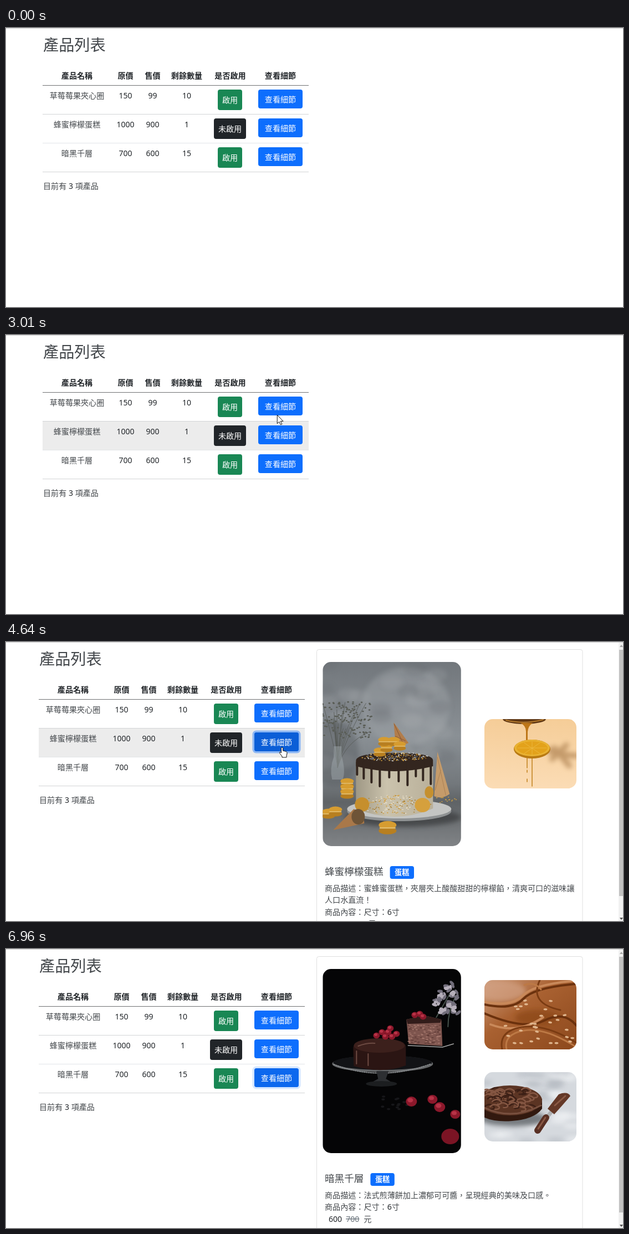
These frames come from a looping animation (1113 px wide and 503 px high, 7020 ms). An HTML page:

```html
<!DOCTYPE html>
<html lang="zh-TW">
<head>
<meta charset="utf-8">
<title>產品列表</title>
<style>
  html, body { margin: 0; width: 100%; height: 100%; overflow: hidden; background: #fff; }
  svg { display: block; }
  text { font-family: "Noto Sans", "Noto Sans CJK TC", "Noto Sans CJK JP", sans-serif; white-space: pre; }
</style>
</head>
<body>
<svg width="1113" height="503" viewBox="0 0 1113 503">
  <defs>
    <clipPath id="mainClip"><rect width="249.5" height="332" rx="15"/></clipPath>
    <clipPath id="thumbClip"><rect width="166" height="125" rx="15"/></clipPath>
    <filter id="soft" x="-50%" y="-50%" width="200%" height="200%"><feGaussianBlur stdDeviation="4"/></filter>
    <linearGradient id="slate" x2="0" y2="1">
      <stop stop-color="#687b86"/><stop offset=".25" stop-color="#5c6d78"/>
      <stop offset=".45" stop-color="#29323c"/><stop offset="1" stop-color="#303943"/>
    </linearGradient>
    <linearGradient id="stone" x2="0" y2="1">
      <stop stop-color="#72777c"/><stop offset=".4" stop-color="#8a9095"/>
      <stop offset=".66" stop-color="#73787c"/><stop offset=".76" stop-color="#5f6366"/><stop offset="1" stop-color="#808386"/>
    </linearGradient>
    <linearGradient id="icing"><stop stop-color="#9f9885"/><stop offset=".4" stop-color="#cbc3ad"/><stop offset="1" stop-color="#b9b09a"/></linearGradient>
    <linearGradient id="rose"><stop stop-color="#d8879a"/><stop offset="1" stop-color="#e19aa9"/></linearGradient>
    <linearGradient id="peach" x2="0" y2="1"><stop stop-color="#f5cd98"/><stop offset="1" stop-color="#fbdcb5"/></linearGradient>
    <linearGradient id="caramel" y2="1"><stop stop-color="#cf9f80"/><stop offset=".4" stop-color="#a96131"/><stop offset="1" stop-color="#8c481c"/></linearGradient>
  </defs>
  <g id="page"></g>
  <g id="cursor" fill="#fff" stroke="#111" stroke-linejoin="round">
    <path id="arrow" d="M0 0V15.5L3.6 12.2L6.2 17.6L8.6 16.5L6 11.3H10.8Z"/>
    <path id="hand" d="M-1.6 1.6Q-1.6 0 0 0T1.6 1.6V6L7.5 7.4Q9.4 8 9 11L8 15V18H0V16L-4.4 10.4Q-5 8 -3 8.4L-1.6 10Z"/>
  </g>
</svg>
<script>
const LOOP = 7020, FONT = 14.08, HOVER_LAG = 120, BLUR_AT = 6870;
const INK = '#212529', THIN_INK = '#43474b', BLUE = '#0d6efd', BLUE_DARK = '#0b5ed7';
const $ = id => document.getElementById(id);

// --- drawing helpers ---
const rect = (x, y, w, h, fill, more = '') => `<rect x="${x}" y="${y}" width="${w}" height="${h}" fill="${fill}" ${more}/>`;
const oval = (x, y, rx, ry, fill, more = '') => `<ellipse cx="${x}" cy="${y}" rx="${rx}" ry="${ry}" fill="${fill}" ${more}/>`;
const shape = (d, fill, more = '') => `<path d="${d}" fill="${fill}" ${more}/>`;
const line = (d, color, width = 1, more = '') => `<path d="${d}" fill="none" stroke="${color}" stroke-width="${width}" stroke-linecap="round" ${more}/>`;
const soft = 'filter="url(#soft)"';

// Light text keeps its Latin letters and digits at regular weight.
function text(x, middle, str, { size = FONT, weight = 300, fill, anchor = 'middle', more = '' } = {}) {
  const light = weight < 400;
  const body = light ? str.replace(/\w+/g, `<tspan font-weight="400" fill="${fill ?? INK}">$&</tspan>`) : str;
  return `<text x="${x}" y="${middle + size * .37}" font-size="${size}" font-weight="${weight}" fill="${fill ?? (light ? THIN_INK : INK)}" text-anchor="${anchor}" ${more}>${body}</text>`;
}

function scatter(count, seed, draw) {
  const random = () => (seed = (seed * 16807) % 2147483647) / 2147483647;
  return Array.from({ length: count }, () => draw(random(), random(), random())).join('');
}
const sprinkles = (x, y, rx, ry, count, seed, colors) => scatter(count, seed, (a, b, c) => {
  const px = x + Math.cos(a * 6.283) * rx * Math.sqrt(b), py = y + Math.sin(a * 6.283) * ry * Math.sqrt(b);
  return oval(px, py, 1.3, .8, colors[Math.floor(c * colors.length)]);
});
const CANDY = ['#f2d9d4', '#fff0ea', '#a94f69'];

// --- pictures, each in its own coordinates ---
const stackedDonut = (x, y, seed) =>
  oval(x, y + 5, 43, 17, '#a87046') + oval(x, y + 8, 38, 12, '#bd8658') +
  shape(`M${x - 43} ${y}Q${x - 40} ${y - 18} ${x} ${y - 18}T${x + 43} ${y}Q${x + 34} ${y + 8} ${x + 24} ${y + 4}T${x} ${y + 7}T${x - 24} ${y + 5}T${x - 43} ${y}`, '#ce8293') +
  sprinkles(x, y - 6, 38, 9, 36, seed, CANDY);

const macaron = (x, y, r) => oval(x, y - r * .25, r, r * .45, '#d69c30') +
  oval(x, y + r * .4, r, r * .4, '#b87f20') + rect(x - r * .9, y, 1.8 * r, r * .15, '#e3bd6d');

const berry = (x, y, r) => oval(x, y, r, r * .9, '#8c182b') + oval(x - r * .2, y - r * .25, r * .5, r * .4, '#b83347');

const pictures = {
  donuts: rect(0, 0, 250, 332, 'url(#slate)') +
    oval(128, 22, 75, 38, '#80919b', `opacity=".6" ${soft}`) +
    line('M180 118L212 48M190 122L236 55M205 125L230 75M215 120L250 80M222 60L246 100', '#394249', 9, `opacity=".7" ${soft}`) +
    rect(50, 92, 132, 28, '#1d252d', soft) + oval(145, 108, 24, 16, '#161d24', soft) +
    oval(215, 158, 40, 32, '#1b222b') + oval(216, 143, 37, 12, '#3d4953') +
    shape('M24 128Q25 168 42 169H72Q89 166 91 126Z', '#64747f') + oval(58, 126, 33, 10, '#9aa6ad') + oval(58, 127, 27, 7, '#53636f') +
    oval(135, 251, 113, 48, '#1b222a', soft) + oval(134, 245, 112, 50, '#77736f') + oval(134, 242, 111, 49, '#b9b4af') + oval(135, 240, 96, 39, '#aaa6a3') +
    [248, 212, 178, 142].map((y, i) => stackedDonut([150, 153, 151, 147][i], y, i + 11)).join('') +
    oval(72, 234, 43, 38, '#b77d54') + oval(70, 230, 42, 39, '#c87589') +
    sprinkles(70, 230, 39, 36, 150, 27, CANDY) + oval(71, 231, 13, 11, '#a8694b') + oval(72, 231, 8, 7, '#c9c5c3'),

  pinkDonut: rect(0, 0, 166, 125, 'url(#rose)') + oval(92, 85, 50, 18, '#b8647a', `opacity=".6" ${soft}`) +
    oval(81, 68, 36, 29, '#bd7e43') + oval(80, 72, 33, 22, '#d99b5d') +
    shape('M42 61Q43 28 80 28T118 60Q114 76 104 68T90 76T73 72T57 73T42 61', '#e47fae') +
    sprinkles(80, 51, 33, 20, 75, 5, ['#f8d4e5', '#9e8dc6', '#f5e2b1', '#bd4d87']) +
    oval(78, 46, 15, 7, '#a96837') + oval(79, 48, 11, 4, '#dda860'),

  donutBoard: rect(0, 0, 166, 125, '#d6d5d3') + line('M0 15H166M27 0V15M107 0V15M64 15V43M142 15V43', '#c2c1c0') +
    oval(150, 105, 48, 40, '#e5e4e5') + shape('M0 82L122 38L166 42V61L105 125H0Z', '#412a22') + line('M35 92L166 52', '#66483a', 3) +
    oval(58, 57, 32, 15, '#a06c52') + oval(57, 52, 32, 12, '#dfc0b5') +
    oval(137, 57, 30, 16, '#9d684e') + oval(136, 52, 30, 13, '#dfcac2') +
    oval(78, 81, 46, 18, '#99543c') + oval(77, 76, 45, 16, '#d47b7c') + oval(76, 72, 14, 4, '#823f3c') +
    oval(24, 108, 28, 20, '#9e5344') + oval(67, 110, 30, 19, '#ad5c4c') + oval(66, 106, 11, 6, '#713b34') +
    sprinkles(72, 74, 43, 14, 35, 8, ['#f6cbc6', '#b24f54']) + sprinkles(44, 108, 47, 15, 50, 9, ['#d79280', '#77372f']),

  honeyCake: rect(0, 0, 250, 332, 'url(#stone)') +
    oval(150, 80, 80, 70, '#a0a5a9', `opacity=".45" ${soft}`) + oval(20, 165, 45, 60, '#5c6165', `opacity=".5" ${soft}`) +
    scatter(36, 14, (a, b, c) => oval(a * 250, b * 215, 20, 12, c > .5 ? '#a5a9ac' : '#666b6f', `opacity=".25" ${soft}`)) +
    scatter(16, 31, (a, b) => line(`M27 190Q${20 + a * 20} 145 ${a * 88} ${70 + b * 62}`, '#555955', .8)) +
    scatter(130, 33, (a, b) => oval(a * 88, 72 + b * 65, 1.8, 1.3, '#595c55')) +
    shape('M20 152H34V169Q42 197 36 212H17Q12 193 20 171Z', '#a5adb2', 'opacity=".45"') +
    oval(145, 280, 105, 17, '#46494c', soft) + oval(138, 269, 94, 18, '#8f9293') + oval(138, 265, 94, 17, '#c4c5c3') +
    shape('M60 178V264Q130 294 199 264V178Z', 'url(#icing)') +
    shape('M60 178Q60 164 130 164T199 178V188Q130 206 60 188Z', '#33261f') +
    [62, 74, 88, 103, 120, 137, 153, 168, 181, 195].map((x, i) => line(`M${x} 181V${203 + i * 7 % 23}`, '#33261f', 4)).join('') +
    sprinkles(130, 257, 66, 17, 170, 17, ['#d79e37', '#eee4cd', '#a97c2b']) +
    sprinkles(130, 171, 60, 8, 220, 18, ['#e1ad40', '#d5d5d0', '#6c747d', '#9a6a22']) +
    shape('M128 109L132 155L155 146Z', '#b27d4b') + line('M129 112L146 149M131 134L149 142', '#875734') +
    [[103, 162], [115, 154], [128, 143], [111, 143], [139, 151]].map(p => macaron(...p, 11)).join('') +
    shape('M207 162L201 242Q215 248 229 238Z', '#c59b6a') + line('M207 172L222 240M213 195L203 231', '#aa8055') +
    oval(71, 257, 13, 13, '#c68f2d') + oval(180, 258, 14, 13, '#d5a03d') + oval(192, 235, 8, 11, '#c5902f') +
    [[44, 218], [44, 228], [44, 237], [10, 273], [23, 269], [117, 298]].map(p => macaron(...p, p[1] > 290 ? 16 : 12)).join('') +
    shape('M19 303L56 265Q75 272 75 291Z', '#a97849') + oval(64, 279, 12, 14, '#6e5437') +
    sprinkles(220, 249, 22, 6, 16, 41, ['#d2a03c']),

  lemon: rect(0, 0, 166, 125, 'url(#peach)') +
    line('M110 54Q130 64 166 66M122 72L148 47M126 52L153 84', '#a97c4b', 10, `opacity=".65" ${soft}`) +
    oval(72, 0, 39, 9, '#5f3714') + line('M39 2Q72 10 106 1', '#b57a2c', 2) +
    shape('M65 7H87Q79 12 78 23V38H75V22Q75 12 65 7', '#bd7618') +
    line('M77 65V88M86 67V121', '#c48624', 1.6) + line('M77 92V96M77 108V113', '#c48624', 1.6) +
    oval(86, 54, 33, 17, '#b97a12') + oval(86, 52, 32, 15, '#e9b232') + oval(86, 52, 28, 12, '#e3a21b') +
    line('M60 52H112M72 43L100 62M100 43L72 62M86 41V64', '#eebb45', .8),

  darkCake: rect(0, 0, 250, 332, '#050506') +
    line('M205 87Q218 64 231 42M226 104Q226 76 239 51', '#44504a', 2) +
    [[231, 34], [242, 45], [220, 48], [211, 60], [235, 66], [222, 74], [245, 72]].map(([x, y]) =>
      scatter(9, x * 19, (a, b) => oval(x + a * 18 - 9, y + b * 16 - 8, 5, 2.6, b > .5 ? '#b5aeb9' : '#716d7a', `transform="rotate(${a * 180} ${x} ${y})"`))).join('') +
    oval(108, 171, 91, 15, '#66686a') + oval(108, 169, 89, 13, '#121316') + line('M20 172Q104 204 196 171', '#85888a', 2, 'stroke-dasharray="2 2"') +
    shape('M97 184H119L114 198L129 207H84L100 198Z', '#2d2f32') + oval(106, 207, 28, 5, '#1c1e20') +
    shape('M55 141Q57 128 103 127T150 140V174Q107 190 56 175Z', '#2b1513') + oval(102, 138, 46, 13, '#3c201c') +
    line('M64 139Q80 133 94 134M61 148V171M82 153V174', '#6d4b43', 2) +
    shape('M151 91L184 84L214 91L216 139L155 135Z', '#7e554e') + shape('M151 91L184 84L214 91L212 97L153 99Z', '#321c1a') +
    scatter(120, 22, (a, b, c) => oval(155 + a * 57, 101 + b * 33, 2.3, .7, c > .5 ? '#a97b70' : '#5d3934')) + line('M154 138L216 141L236 135', '#a8a8a7', 1.5) +
    [[97, 120], [107, 114], [118, 114], [125, 122], [113, 122], [133, 117], [122, 107], [166, 83], [175, 81], [181, 86]].map(p => berry(...p, 6)).join('') +
    scatter(14, 51, (a, b) => oval(108 + a * 70, 229 + b * 27, 3, 1.8, '#17171a')) +
    [[160, 239, 10], [198, 235, 9], [211, 249, 10], [239, 262, 9]].map(p => berry(...p)).join('') + oval(230, 302, 16, 14, '#7b1424'),

  cream: rect(0, 0, 166, 125, 'url(#caramel)') +
    oval(30, 20, 45, 18, '#d3a284', `opacity=".7" ${soft}`) + oval(95, 68, 40, 14, '#8b4719', `opacity=".7" ${soft}`) +
    line('M0 44Q50 55 70 34T166 7M0 60Q72 91 108 73T166 82', '#6b310d', 4) +
    line('M0 39Q48 49 69 28T166 1M11 80Q60 99 106 67', '#c9895a', 4) +
    line('M32 125Q25 92 67 85T166 113M100 0Q80 42 137 54', '#7a3b12', 3) +
    line('M40 125Q34 98 71 91T166 121M72 9Q91 2 102 17', '#bd7945', 3) +
    scatter(30, 73, (a, b, c) => oval(38 + a * 122, 35 + b * 79, 3.4, 1.8, '#dfb58d', `transform="rotate(${c * 25 - 12} ${38 + a * 122} ${35 + b * 79})"`)),

  frostedCake: rect(0, 0, 166, 125, '#d5d9de') +
    scatter(40, 62, (a, b, c) => oval(a * 166, b * 125, 15, 5, c > .55 ? '#b0b6bd' : '#f4f6f8', `opacity=".55" ${soft}`)) +
    oval(52, 84, 60, 14, '#777b80', soft) + shape('M-10 53V76Q10 91 50 88T104 66V48Z', '#32190f') +
    oval(46, 51, 58, 27, '#5b3423') +
    scatter(44, 92, (a, b, c) => line(`M${a * 84 - 4} ${31 + b * 36}q8 -7 16 0q3 5 -7 5`, c > .4 ? '#845642' : '#3d2016', 2.5)) +
    line('M0 64Q50 88 102 60', '#79503f', 3) +
    line('M122 70L109 86', '#aeb0b2', 7) + shape('M114 66L134 40Q150 34 155 43Q146 54 126 76Z', '#643827') + line('M127 60L146 43', '#8b5a45', 3) +
    line('M111 82L96 105', '#593024', 12) + line('M110 82L97 102', '#8a5945', 3)
};

// --- data ---
const products = [
  { name: '草莓莓果夾心圈', tag: '甜甜圈', price: 150, sale: 99, left: 10, on: true,
    lines: ['商品描述：濃郁的草莓風味，中心填入滑順不膩口的卡士達內餡，帶來滿', '滿幸福感！', '商品內容：尺寸：14x14cm'] },
  { name: '蜂蜜檸檬蛋糕', tag: '蛋糕', price: 1000, sale: 900, left: 1, on: false,
    lines: ['商品描述：蜜蜂蜜蛋糕，夾層夾上酸酸甜甜的檸檬餡，清爽可口的滋味讓', '人口水直流！', '商品內容：尺寸：6寸'] },
  { name: '暗黑千層', tag: '蛋糕', price: 700, sale: 600, left: 15, on: true,
    lines: ['商品描述：法式煎薄餅加上濃郁可可醬，呈現經典的美味及口感。', '商品內容：尺寸：6寸'] }
];
const columns = [['產品名稱', 128], ['原價', 215.5], ['售價', 264.5], ['剩餘數量', 326], ['是否啟用', 404.5], ['查看細節', 495]];
const clicks = [3430, 4440, 5400];            // detail button of each row
const toggled = [[900, 1490], [2210, 2680]];  // status switched and switched back

// Text follows the click at once; pictures arrive later.
const views = [
  [3430, 0, 'donuts', ['pinkDonut', 'donutBoard']],
  [4440, 1, 'donuts', ['pinkDonut']],
  [4640, 1, 'honeyCake', ['lemon']],
  [5400, 2, 'honeyCake', ['lemon', 'frostedCake']],
  [5470, 2, 'darkCake', ['lemon', 'frostedCake']],
  [5620, 2, 'darkCake', ['cream', 'frostedCake']]
];

const path = [
  [120, 800, 495], [800, 404, 136], [1700, 404, 136], [2150, 412, 177], [2780, 412, 177],
  [3040, 492, 143], [3360, 495, 124], [3830, 495, 124], [4370, 498, 190],
  [5200, 498, 190], [5350, 499, 229], [5940, 499, 229], [6620, 1092, 500]
];

const clamp = v => Math.max(0, Math.min(1, v));
const shiftAt = t => t < clicks[0] ? 0 : -7;

function pointer(t) {
  if (t < path[0][0] || t >= path.at(-1)[0]) return null;
  const i = path.findIndex(k => k[0] > t), [t0, x0, y0] = path[i - 1], [t1, x1, y1] = path[i];
  const u = (t - t0) / (t1 - t0), s = u * u * (3 - 2 * u);
  return { x: x0 + (x1 - x0) * s, y: y0 + (y1 - y0) * s };
}

const isOn = (row, t) => products[row].on !== (row in toggled && t >= toggled[row][0] && t < toggled[row][1]);

function hit(p, t) {
  if (!p) return {};
  const x = p.x - shiftAt(t), row = Math.floor((p.y - 104) / 52);
  if (x < 66 || x > 546 || row < 0 || row > 2) return {};
  const y = p.y - row * 52, half = isOn(row, t) ? 22 : 29;
  const button = x > 455 && x < 535 && y > 111 && y < 143.5 ? 'detail'
    : Math.abs(x - 404) < half && y > 111 && y < 148 ? 'status' : '';
  return { row, button };
}

// --- page parts ---
function tableRow(product, row, t, hover) {
  const y = row * 52, on = isOn(row, t), over = hover.row === row, half = on ? 22 : 29;
  const pressed = over && hover.button === 'status';
  const color = on ? (pressed ? '#157347' : '#198754') : (pressed ? '#1c1f23' : INK);
  const end = clicks[row + 1] ?? BLUR_AT;
  const focus = clamp((t - clicks[row]) / 150) * (1 - clamp((t - end) / 150));
  const dark = over && hover.button === 'detail' ? 1 : focus;
  return (over ? rect(66, y + 104, 480, 52, '#ececec') : '') +
    rect(66, y + 155, 480, 1, row === 1 ? '#e2e5e8' : '#d2d4d6') +
    [product.name, product.price, product.sale, product.left].map((v, i) => text(columns[i][1], y + 122, String(v))).join('') +
    rect(404 - half, y + 111, half * 2, 37, color, 'rx="4"') +
    text(404, y + 130, on ? '啟用' : '未啟用', { fill: '#fff' }) +
    rect(451.5, y + 107.5, 87, 41, '#3184fd', `rx="7" opacity="${focus * .5}"`) +
    rect(455, y + 111, 80, 34, BLUE, 'rx="4"') +
    rect(455, y + 111, 80, 34, BLUE_DARK, `rx="4" opacity="${dark}"`) +
    text(495, y + 128.3, '查看細節', { fill: '#fff' });
}

const table = (t, hover) => `<g transform="translate(${shiftAt(t)})">` +
  text(67, 30.5, '產品列表', { size: 28.16, anchor: 'start' }) +
  columns.map(([label, x]) => text(x, 86, label, { weight: 700 })).join('') +
  products.map((p, i) => tableRow(p, i, t, hover)).join('') +
  rect(66, 103, 480, 1, '#6f7173') +
  text(67, 285, '目前有 3 項產品', { anchor: 'start' }) + '</g>';

const photo = (name, x, y, clip) => `<g transform="translate(${x} ${y})" clip-path="url(#${clip})">${pictures[name]}</g>`;

function card([, index, main, thumbs]) {
  const { name, tag, lines, sale, price } = products[index], left = { anchor: 'start' };
  const badge = 587 + name.length * 17.6, priceY = 444 + lines.length * 21.2;
  const oldX = 582 + String(sale).length * 8.06 + 7, unitX = oldX + String(price).length * 8.06 + 8;
  return rect(560.5, 13.5, 479.5, 520, '#fff', 'rx="4" stroke="#dfdfdf"') +
    photo(main, 571.3, 36, 'mainClip') +
    thumbs.map((n, i) => photo(n, 863, thumbs.length > 1 ? 56 + i * 166 : 139, 'thumbClip')).join('') +
    text(575, 413, name, { size: 17.6, ...left }) +
    rect(badge, 404, tag.length * 13.2 + 17, 23, BLUE, 'rx="4"') +
    text(badge + 8.5, 415.3, tag, { size: 13.2, weight: 700, fill: '#fff', ...left }) +
    lines.map((s, i) => text(575, 444 + i * 21.2, s, left)).join('') +
    text(582, priceY, String(sale), left) +
    text(oldX, priceY, String(price), { ...left, fill: '#6c757d', more: 'text-decoration="line-through"' }) +
    text(unitX, priceY, '元', left);
}

// Shorter descriptions leave less to scroll, so the thumb grows.
const scrollbar = lineCount => rect(1105, 1, 8, 502, '#f1f1f1') + rect(1106, 14, 7, 495 - lineCount * 17, '#c1c1c1') +
  shape('M1107 9L1110 5L1113 9Z', '#a3a3a3') + shape('M1107 497L1110 501L1113 497Z', '#505050');

let lastPage = '';
function frame() {
  const t = performance.now() % LOOP;
  const view = views.findLast(v => t >= v[0]);
  const page = table(t, hit(pointer(t - HOVER_LAG), t)) +
    (view ? card(view) + scrollbar(products[view[1]].lines.length) : '') + rect(0, 0, 1113, 1, '#d0d0d0');
  if (page !== lastPage) $('page').innerHTML = lastPage = page;

  const p = pointer(t);
  $('cursor').style.display = p ? '' : 'none';
  if (p) {
    const overButton = !!hit(p, t).button;
    $('cursor').setAttribute('transform', `translate(${p.x} ${p.y})`);
    $('hand').style.display = overButton ? '' : 'none';
    $('arrow').style.display = overButton ? 'none' : '';
  }
  requestAnimationFrame(frame);
}
frame();
</script>
</body>
</html>
```
